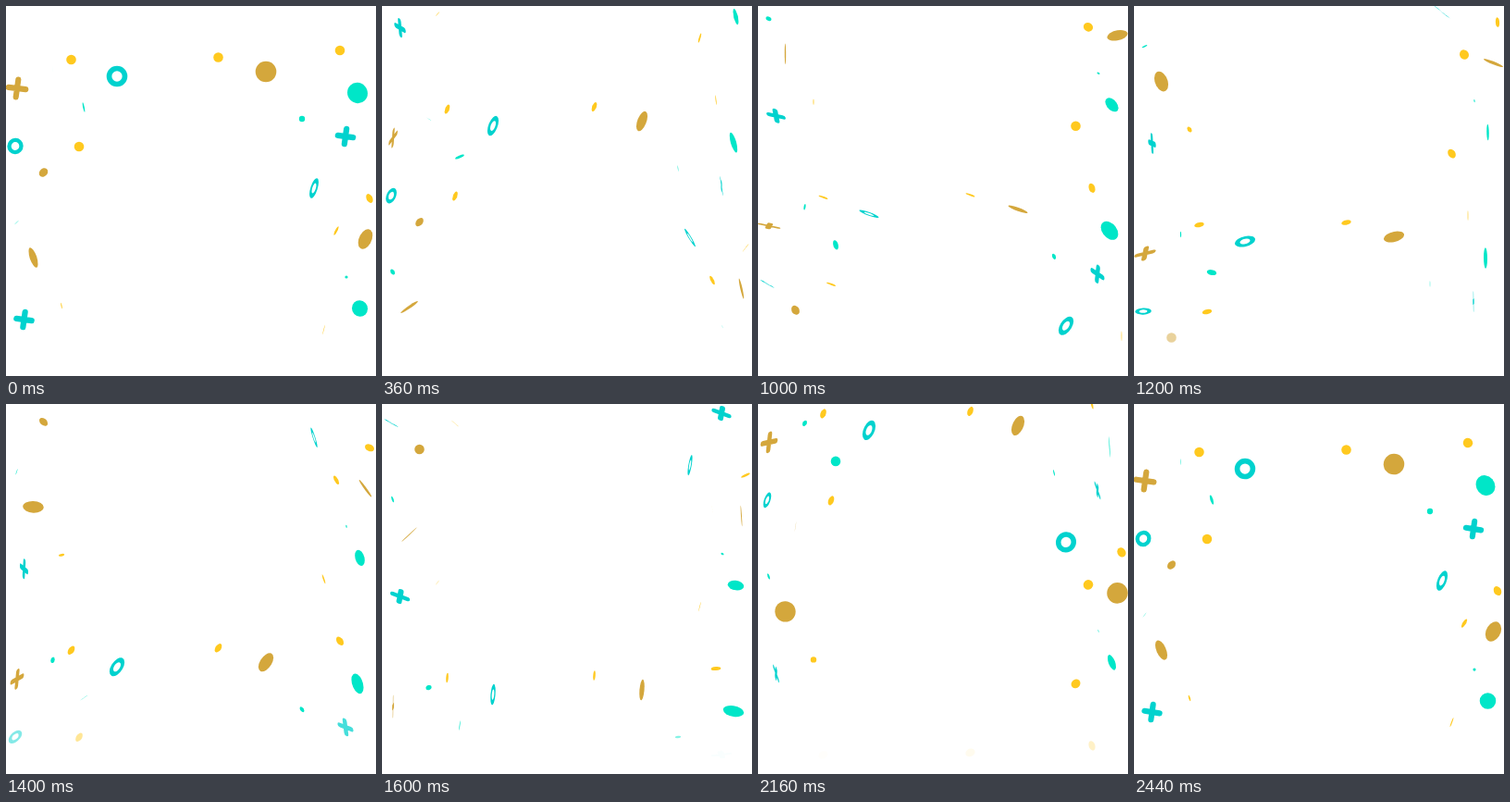
Animation of 400 by 400 pixels, one loop 2.48 s. Source, as an HTML page with a canvas:

```html
<!DOCTYPE html>
<html lang="en">
<head>
<meta charset="utf-8">
<title>Confetti</title>
<style>
  html, body { margin: 0; width: 100%; height: 100%; overflow: hidden; background: #fff; }
  canvas { display: block; width: 400px; height: 400px; }
</style>
</head>
<body>
<canvas id="stage" width="400" height="400"></canvas>
<script>
const LOOP = 2480, STEP = 40, FALL = 369;
const GOLD = '#d4a73c', YELLOW = '#ffc91f', MINT = '#00e6c8', CYAN = '#00d2ce';
const LARGE = 11.3, MEDIUM = 8.8, SMALL = 5.3, TINY = 3.2;

// Turn rates around the x and y axes, in degrees per second.
const DRIFT = { tilt: 100, turn: 160 };
const ROLL = { tilt: 180, turn: 172 };
const FLIP = { tilt: -155, turn: 228 };

const ctx = document.getElementById('stage').getContext('2d');
const pieces = [];

function disc(r) {
  ctx.beginPath();
  ctx.arc(0, 0, r, 0, Math.PI * 2);
  ctx.fill();
}

function ring(r) {
  const width = r / 2;
  ctx.lineWidth = width;
  ctx.beginPath();
  ctx.arc(0, 0, r - width / 2, 0, Math.PI * 2);
  ctx.stroke();
}

function plus(r) {
  const arm = r - 3;
  ctx.rotate(0.14);
  ctx.lineWidth = 6.2;
  ctx.beginPath();
  ctx.moveTo(-arm, 0);
  ctx.lineTo(arm, 0);
  ctx.moveTo(0, -arm);
  ctx.lineTo(0, arm);
  ctx.stroke();
}

// Each spot is x, y and, if the piece was already spinning, for how many ms.
function add(draw, color, size, spin, ...spots) {
  for (const [x, y, lead = 0] of spots) pieces.push({ draw, color, size, spin, x, y, lead });
}

add(disc, GOLD, LARGE, DRIFT, [281, 71], [388.5, 252, 290]);
add(disc, YELLOW, SMALL, DRIFT, [70.5, 58], [229.5, 55.5], [79, 152]);
add(disc, MINT, TINY, DRIFT, [50.5, 68.5, 560]);
add(ring, CYAN, LARGE, DRIFT, [120, 76], [333, 197, 400]);
add(ring, CYAN, MEDIUM, DRIFT, [10, 151.5, -60]);
add(plus, GOLD, 12.5, DRIFT, [12, 89, 60]);

add(disc, GOLD, SMALL, ROLL, [40.5, 180, -150]);
add(disc, YELLOW, SMALL, ROLL, [357, 243, 350], [343.5, 350, 440]);

add(disc, GOLD, LARGE, FLIP, [29.5, 272, 280]);
add(disc, MINT, LARGE, FLIP, [380, 94, -60]);
add(disc, MINT, MEDIUM, FLIP, [382.5, 327, 60]);
add(disc, MINT, SMALL, FLIP, [84, 109.5, 330]);
add(disc, MINT, TINY, FLIP, [320, 122], [11.5, 234, 600]);
add(disc, MINT, TINY / 2, FLIP, [368, 293]);
add(disc, YELLOW, SMALL, FLIP, [361, 48], [393, 208, 200]);
add(disc, YELLOW, TINY, FLIP, [60, 324, 330]);
add(plus, CYAN, LARGE, FLIP, [367, 141], [19.5, 339]);

// Pieces from the upper half fade out near the floor, the others just end.
function opacity(p, y) {
  if (p.y > 190) return y < 374 ? 1 : 0;
  return Math.max(0, Math.min(1, (380 - y) / 42));
}

// A negative time is a piece entering for the next loop.
function drawPiece(p, time) {
  const y = p.y + FALL * time / LOOP;
  const alpha = opacity(p, y);
  if (y < -15 || !alpha) return;
  const age = (time + p.lead) / 1000 * Math.PI / 180;
  const a = p.spin.tilt * age;
  const b = p.spin.turn * age;
  ctx.setTransform(Math.cos(b), -Math.sin(a) * Math.sin(b), 0, Math.cos(a), p.x, y);
  ctx.globalAlpha = alpha;
  ctx.fillStyle = ctx.strokeStyle = p.color;
  p.draw(p.size);
}

function render(ms) {
  const time = Math.floor(ms % LOOP / STEP) * STEP;
  ctx.setTransform(1, 0, 0, 1, 0, 0);
  ctx.clearRect(0, 0, 400, 400);
  ctx.lineCap = 'round';
  for (const p of pieces) {
    drawPiece(p, time);
    drawPiece(p, time - LOOP);
  }
}

const start = performance.now();
function tick() {
  render(performance.now() - start);
  requestAnimationFrame(tick);
}
tick();
</script>
</body>
</html>
```
